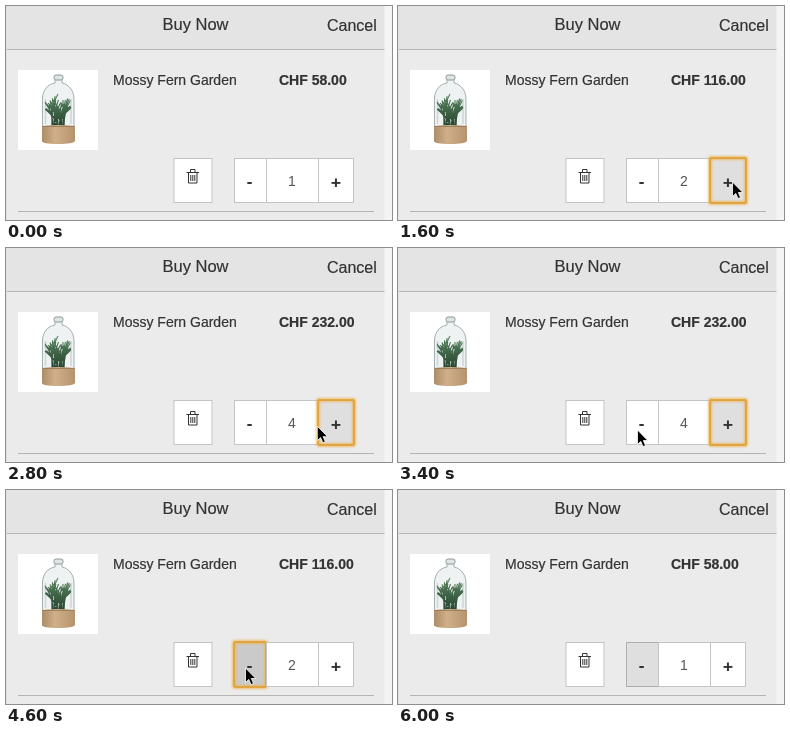
An HTML page for the animation above (6530 ms loop, 386x214 px).

```html
<!DOCTYPE html>
<html lang="en">
<head>
<meta charset="utf-8">
<title>Cart quantity</title>
<style>
html, body { margin: 0; width: 100%; height: 100%; overflow: hidden; background: #ebebeb; }
svg { display: block; width: 386px; height: 214px; }
text { font: 14px "Liberation Sans", Arial, sans-serif; fill: #333; stroke: #333; stroke-width: .2px; }
.bold { font-weight: bold; }
.sign { font-size: 17px; }
.mid { text-anchor: middle; }
.box { fill: #fff; stroke: #c4c4c4; }
.ring { fill: none; stroke: #dea036; stroke-width: 1.5px; }
.halo { fill: none; stroke: #eeb65a; stroke-width: 3.5px; }
</style>
</head>
<body>
<svg viewBox="0 0 386 214">
  <defs>
    <linearGradient id="wood">
      <stop stop-color="#ad8d68"/><stop offset=".4" stop-color="#d0b08a"/><stop offset="1" stop-color="#b4936d"/>
    </linearGradient>
    <linearGradient id="leaf" gradientUnits="userSpaceOnUse" x1="0" y1="88" x2="0" y2="121">
      <stop stop-color="#5a8560"/><stop offset="1" stop-color="#26432f"/>
    </linearGradient>
    <filter id="soft" x="-30%" y="-30%" width="160%" height="160%"><feGaussianBlur stdDeviation="1"/></filter>
  </defs>
  <rect width="386" height="214" fill="#ebebeb"/>
  <rect width="379" height="43" fill="#e4e4e4"/>
  <rect x="378.500" width="8" height="214" fill="#f4f4f4"/>
  <path d="M1 43.500H378.500M12 205.500H368" stroke="#b5b5b5"/>
  <path d="M.5 0V214" stroke="#e0e0e0"/>
  <text x="156.500" y="24" style="font-size:16.5px">Buy Now</text>
  <text x="321" y="25" style="font-size:16px">Cancel</text>
  <text x="107" y="79">Mossy Fern Garden</text>
  <text x="273" y="79" class="bold" id="price"></text>

  <rect x="12" y="64" width="80" height="80" fill="#fff"/>
  <path d="M49 74V77C42 78 36.500 84 36.500 93V121H68V93C68 84 62 78 56 77V74" fill="#eef2f2" stroke="#a3adad"/>
  <rect x="48" y="69" width="9" height="5" rx="2" fill="#dfe5e5" stroke="#8f9a9a"/>
  <path d="M39.500 93V118M65 93V118" stroke="#cdd5d5" stroke-width="1.500"/>
  <path id="grass" fill="none" stroke="url(#leaf)" stroke-width="1.100"/>
  <path d="M36 120Q52 118 69 120V135Q68 138 52 138T36 135Z" fill="url(#wood)"/>
  <path d="M37 120.500H68" stroke="#94795a" stroke-width=".8"/>

  <rect class="box" x="168" y="152.500" width="38" height="44"/>
  <path d="M180.500 166.500H193M184.500 166V163.500H189V166M182.500 167V177H191V167M184.800 169V175M186.800 169V175M188.800 169V175" fill="none" stroke="#333"/>
  <g id="minus">
    <rect class="box" x="228.500" y="152.500" width="32" height="44"/>
    <g>
      <rect class="halo" x="228" y="152" width="32" height="45" rx="1" filter="url(#soft)"/>
      <rect class="ring" x="228" y="152" width="32" height="45" rx="1"/>
    </g>
  </g>
  <rect class="box" x="260.500" y="152.500" width="52" height="44"/>
  <g id="plus">
    <rect class="box" x="312.500" y="152.500" width="35" height="44"/>
    <g>
      <rect class="halo" x="312" y="152" width="36" height="45" rx="1" filter="url(#soft)"/>
      <rect class="ring" x="312" y="152" width="36" height="45" rx="1"/>
    </g>
  </g>
  <text class="bold sign mid" x="243.700" y="181">-</text>
  <text class="mid" x="286" y="180" id="count" style="fill:#555;stroke:none"></text>
  <text class="bold sign mid" x="330" y="182">+</text>
  <path id="cursor" d="M0 0V14.500L3.300 11.400L5.500 16.600L8 15.500L5.800 10.500H10.300Z" fill="#000" stroke="#fff" stroke-width=".8" stroke-linejoin="round"/>
</svg>
<script>
const $ = id => document.getElementById(id);
const LOOP = 6530, STEPS_PER_MS = 0.015, UNIT_PRICE = 58;

// Each entry starts at a step and holds until the next one.
const counts = [[0, 1], [22, 2], [30, 3], [40, 4], [62, 3], [69, 2], [76, 1]];
const focus = [[0, ''], [22, 'plus'], [60, 'minus']];
const presses = [[22, 24], [30, 33], [40, 42], [60, 64], [69, 72], [76, 78]];
const path = [[13, 364, 195], [19, 334.5, 176], [41, 334.5, 176], [46, 259.5, 183],
  [50, 259.5, 183], [51, 239.5, 182], [53, 239.5, 180], [55, 239.5, 178]];

const held = (list, s) => list.filter(e => e[0] <= s).pop()[1];

function pointer(s) {
  const i = path.findIndex(p => p[0] > s);
  if (i < 1) return path[i ? path.length - 1 : 0].slice(1);
  const [a, b] = [path[i - 1], path[i]];
  const k = Math.sin((s - a[0]) / (b[0] - a[0]) * Math.PI / 2);
  return [1, 2].map(n => a[n] + (b[n] - a[n]) * k);
}

function growGrass() {
  const blade = (_, i) => {
    const x = 46 + i * 7 % 13;
    const tip = 52 + 13 * Math.sin(i * 2.4);
    const y = 88 + 10 * Math.abs(Math.sin(i * 1.7)) + Math.abs(tip - 52) * 0.4;
    return `M${x} 121Q${x} ${y + 10} ${tip} ${y}`;
  };
  $('grass').setAttribute('d', Array.from({ length: 48 }, blade).join(''));
}

function draw(now) {
  const s = Math.floor(now % LOOP * STEPS_PER_MS + 0.1);
  const count = held(counts, s), active = held(focus, s);
  const pressed = presses.some(([from, to]) => s >= from && s < to);
  const fade = Math.max(0, Math.min(1, (90 - s) / 4));

  $('count').textContent = count;
  $('price').textContent = `CHF ${(count * UNIT_PRICE).toFixed(2)}`;
  for (const id of ['minus', 'plus']) {
    const [box, glow] = $(id).children;
    const on = id === active;
    box.style.fill = !on ? '#fff' : pressed ? '#cacaca' : '#dfdfdf';
    box.style.stroke = on ? '#adadad' : '#c4c4c4';
    glow.style.opacity = on ? fade : 0;
  }
  $('cursor').style.opacity = s < 13 ? 0 : fade;
  $('cursor').setAttribute('transform', `translate(${pointer(s)})`);
}

growGrass();
const start = performance.now();
function tick() {
  draw(performance.now() - start);
  requestAnimationFrame(tick);
}
tick();
</script>
</body>
</html>
```
